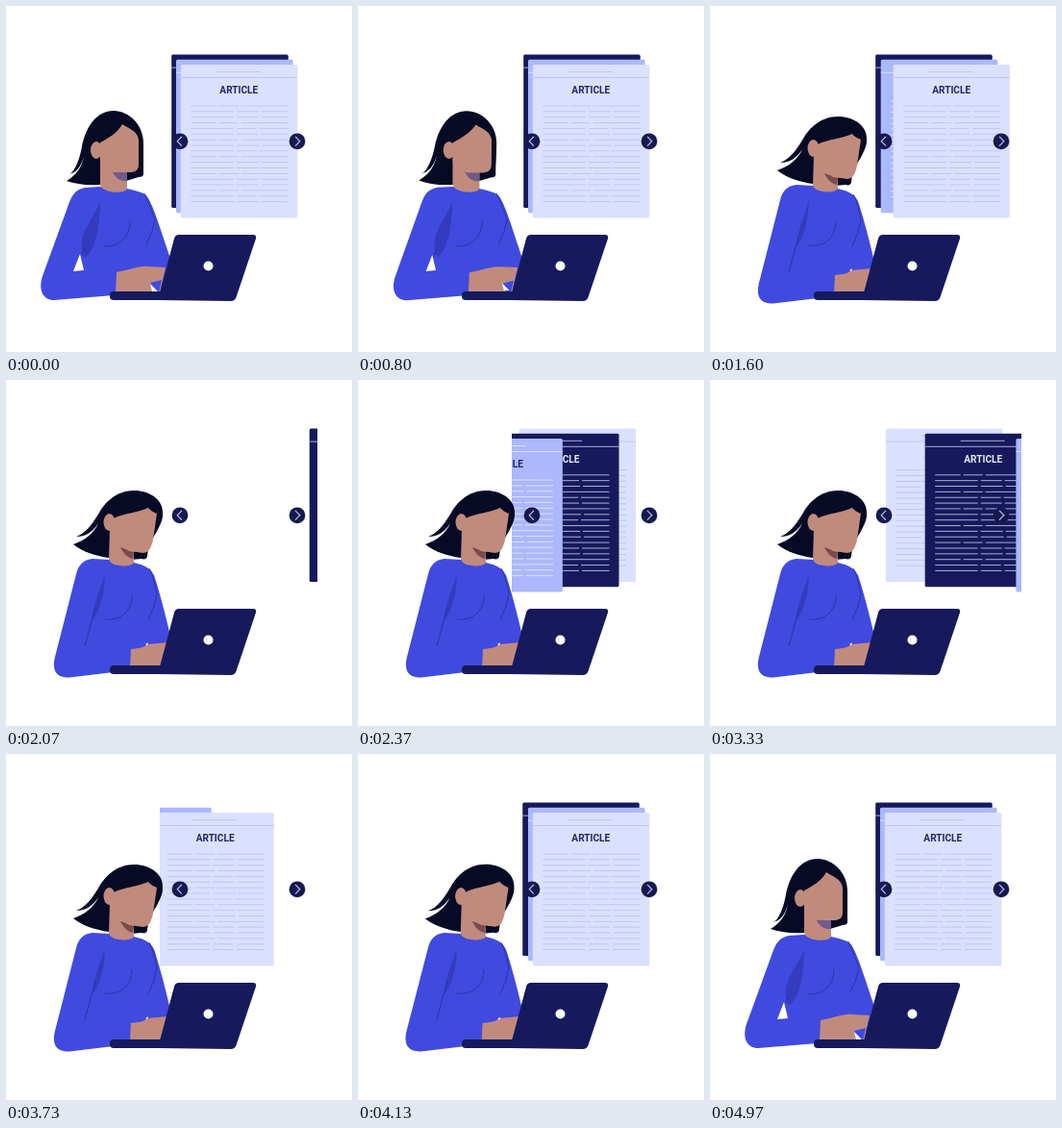
Write an HTML page with a canvas that moves like this. It is 360 px wide and 360 px high and loops after 5010 ms.

```html
<!DOCTYPE html>
<html lang="en">
<head>
<meta charset="utf-8">
<title>Browsing articles</title>
<style>
html, body { margin: 0; width: 100%; height: 100%; overflow: hidden; background: #fff; }
canvas { display: block; width: 360px; height: 360px; }
</style>
</head>
<body>
<canvas id="stage"></canvas>
<script>
const LOOP = 5010;
const canvas = document.getElementById('stage');
const ctx = canvas.getContext('2d');
const dpr = window.devicePixelRatio || 1;
canvas.width = canvas.height = 360 * dpr;

const NAVY = '#161a5c', BLUE = '#404adf', FOLD = '#2c329f', SKIN = '#c08b7d', HAIR = '#070a25';
const LIGHT = { fill: '#dbe0fe', line: '#bdc4ea', text: '#22266a' };
const MID = { fill: '#abb8fb', line: '#e0e5ff', text: '#22266a' };
const DARK = { fill: NAVY, line: '#b9bfe2', text: '#e8ebff' };

// Each stack is listed from front to back.
const TRAVEL = 152, SLIDE = 493, STAGGER = 113;
const stacks = [
  { cards: [LIGHT, MID, DARK], enter: null, exit: 1359 },
  { cards: [MID, DARK, LIGHT], enter: i => 2085 + (2 - i) * STAGGER, exit: 2851 },
  { cards: [LIGHT, MID, DARK], enter: i => 3551 + i * STAGGER, exit: Infinity }
];

const clamp = v => Math.max(0, Math.min(1, v));
const lerp = (a, b, k) => a + (b - a) * k;
const easeInOut = p => p < 0.5 ? 4 * p ** 3 : 1 - 4 * (1 - p) ** 3;

// Interpolates every number in two strings of the same structure.
function blend(a, b, k) {
  const to = b.match(/[\d.]+/g);
  let i = 0;
  return a.replace(/[\d.]+/g, n => lerp(+n, +to[i++], k).toFixed(2));
}

function fill(color, a, b, k) {
  ctx.fillStyle = color;
  ctx.fill(new Path2D(blend(a, b, k)));
}

function stroke(color, width, a, b, k) {
  ctx.strokeStyle = color;
  ctx.lineWidth = width;
  ctx.stroke(new Path2D(blend(a, b, k)));
}

function rule(x1, x2, y) {
  ctx.beginPath();
  ctx.moveTo(x1, y);
  ctx.lineTo(x2, y);
  ctx.stroke();
}

function page(x, y, look) {
  ctx.fillStyle = look.fill;
  ctx.beginPath();
  ctx.roundRect(x, y, 121.5, 159.5, 1.5);
  ctx.fill();
  ctx.strokeStyle = look.line;
  ctx.lineWidth = 0.9;
  rule(x, x + 121.5, y + 13.5);
  rule(x + 37, x + 83, y + 7.5);
  for (let i = 0; i < 18; i++) {
    const ly = y + 43 + i * 5.86;
    const g1 = x + (i % 3 ? 55 + (i * 5) % 5 : 37), g2 = x + (i % 3 ? 79 + i % 4 : 60);
    rule(x + 10.5, g1, ly);
    rule(g1 + 3, g2, ly);
    rule(g2 + 3, x + 111.5, ly);
  }
  ctx.fillStyle = look.text;
  ctx.font = 'bold 10.1px Roboto, "Liberation Sans", sans-serif';
  ctx.textAlign = 'center';
  ctx.fillText('ARTICLE', x + 60.5, y + 30);
}

function pages(t) {
  ctx.save();
  ctx.beginPath();
  ctx.rect(160, 40, 164, 190);
  ctx.clip();
  for (const s of stacks) {
    for (let i = 2; i >= 0; i--) {
      const inP = s.enter ? clamp((t - s.enter(i)) / SLIDE) : 1;
      const outP = clamp((t - s.exit - i * STAGGER) / SLIDE);
      if (inP === 0 || outP === 1) continue;
      const dx = TRAVEL * (outP ** 4 - (1 - inP) ** 4);
      page(181.8 - i * 4.8 + dx, 61 - i * 5.2, s.cards[i]);
    }
  }
  ctx.restore();
}

function arrow(x, dir) {
  ctx.fillStyle = '#151950';
  ctx.beginPath();
  ctx.arc(x, 140.8, 8.4, 0, 7);
  ctx.fill();
  ctx.strokeStyle = '#c3c9f3';
  ctx.lineWidth = 1.1;
  ctx.beginPath();
  ctx.moveTo(x - 2 * dir, 135.9);
  ctx.lineTo(x + 2.8 * dir, 140.8);
  ctx.lineTo(x - 2 * dir, 145.7);
  ctx.stroke();
}

function woman(k) {
  fill(HAIR,
    'M112,109 C128,109 143,124 143,142 C143,154 143,164 143,170 L143,175 C143,177 141,178 138,178 L125,182 L97,186 C84,187 72,185 63,182 C73,176 79,168 81,156 C78,168 73,173 66,175 C72,172 77,158 79,146 C83,126 94,109 112,109Z',
    'M133,115 C150,115 164,125 163,139 C164,150 151,165 148,175 L147,183 C147,186 144,187 141,186 L130,187 L107,185 C93,183 80,179 70,171 C82,167 92,159 96,149 C91,157 84,163 73,163 C84,159 91,148 97,138 C104,126 116,115 133,115Z', k);
  fill(BLUE,
    'M97,188 L82,189 C72,191 69,197 66,204 L38,281 C33,296 39,306 50,306 L112,301 L160,298 L172,265 C163,240 155,212 148,200 C145,194 138,193 126,190Z',
    'M107,187 L90,186 C79,187 75,194 73,202 L51,288 C47,304 54,310 66,309.5 L112,304 L160,300 L171,266 C166,245 161,225 155,206 C152,196 145,193 133,190Z', k);
  fill('#353bbd',
    'M98,204 C92,218 80,232 79,245 C78,254 80,260 83,262 C92,252 97,238 98,204Z',
    'M103,203 C98,216 93,230 91,242 C90,247 90,249 90,250 C98,240 102,225 103,203Z', k);
  stroke(FOLD, 0.9, 'M82,252 L78,260', 'M93,236 L82,277', k);
  stroke(FOLD, 0.9, 'M129,224 C129,240 118,251 102,250', 'M131,224 C131,240 120,251 103,249', k);
  stroke(FOLD, 0.9, 'M155,222 Q153,235 146,248', 'M157,222 Q155,236 148,250', k);
  stroke(FOLD, 0.9, 'M144,195 C150,210 152,214 155,222', 'M149,196 C154,206 155,214 157,222', k);
  fill('#fff', 'M77,258 L70,276 L81,275Z', 'M82,276 L82,276 L82,276Z', k);
  fill(SKIN,
    'M115,277 C128,275 138,270 148,271 L166,272 L160,298 L114,299Z',
    'M130,280 C138,279 143,279 147,275 L168,273 L160,299 L129,299Z', k);
  fill(BLUE, 'M150,288 L162,285 L159,298 L154,297Z', 'M160,298 L161,298 L160,299 L159,299Z', k);
  fill('#fff', 'M150,289 L158,297 L152,297Z', 'M145,275 L148,273 L147,276Z', k);
  fill(SKIN,
    'M98,155 L98,186 C100,195 124,196 126,190 L126,165Z',
    'M108,155 L107,187 C110,195 131,195 133,190 L133,170Z', k);
  fill(blend('rgb(112,92,136)', 'rgb(122,76,76)', k),
    'M110,171 L126,173 L126,182 C118,183 113,178 110,171Z',
    'M119,174 L133,179 L132,186 C126,185 122,180 119,174Z', k);
  fill(SKIN,
    'M98,142 C106,138 116,132 121,123 C127,127 137,130 138,139 L138,165 C138,171 134,173 129,173 L112,173 L98,165Z',
    'M109,148 C113,139 132,140 148,133 C150,136 154,138 157,139 L153,166 C151,175 149,179 143,180 L128,178 L109,165Z', k);
  ctx.fillStyle = SKIN;
  ctx.beginPath();
  ctx.ellipse(lerp(94, 107.5, k), lerp(150, 148, k), 6, 9, 0, 0, 7);
  ctx.fill();
}

function laptop() {
  ctx.fillStyle = NAVY;
  ctx.beginPath();
  ctx.roundRect(108, 297, 70, 9, 4);
  ctx.fill();
  ctx.fill(new Path2D('M180,238 L257,238 Q261,238 260,242 L239.5,303 Q238,307 234,307 L158,306 L175,242 Q176,238 180,238Z'));
  ctx.fillStyle = '#fff';
  ctx.beginPath();
  ctx.arc(210.5, 270.5, 5, 0, 7);
  ctx.fill();
}

function draw(t) {
  ctx.setTransform(dpr, 0, 0, dpr, 0, 0);
  ctx.fillStyle = '#fff';
  ctx.fillRect(0, 0, 360, 360);
  ctx.lineCap = 'butt';
  const lean = easeInOut(clamp((t - 635) / 690)) - easeInOut(clamp((t - 4000) / 690));
  pages(t);
  arrow(181, -1);
  arrow(303, 1);
  woman(lean);
  laptop();
}

const start = performance.now();
function tick() {
  draw((performance.now() - start) % LOOP);
  requestAnimationFrame(tick);
}
tick();
</script>
</body>
</html>
```
